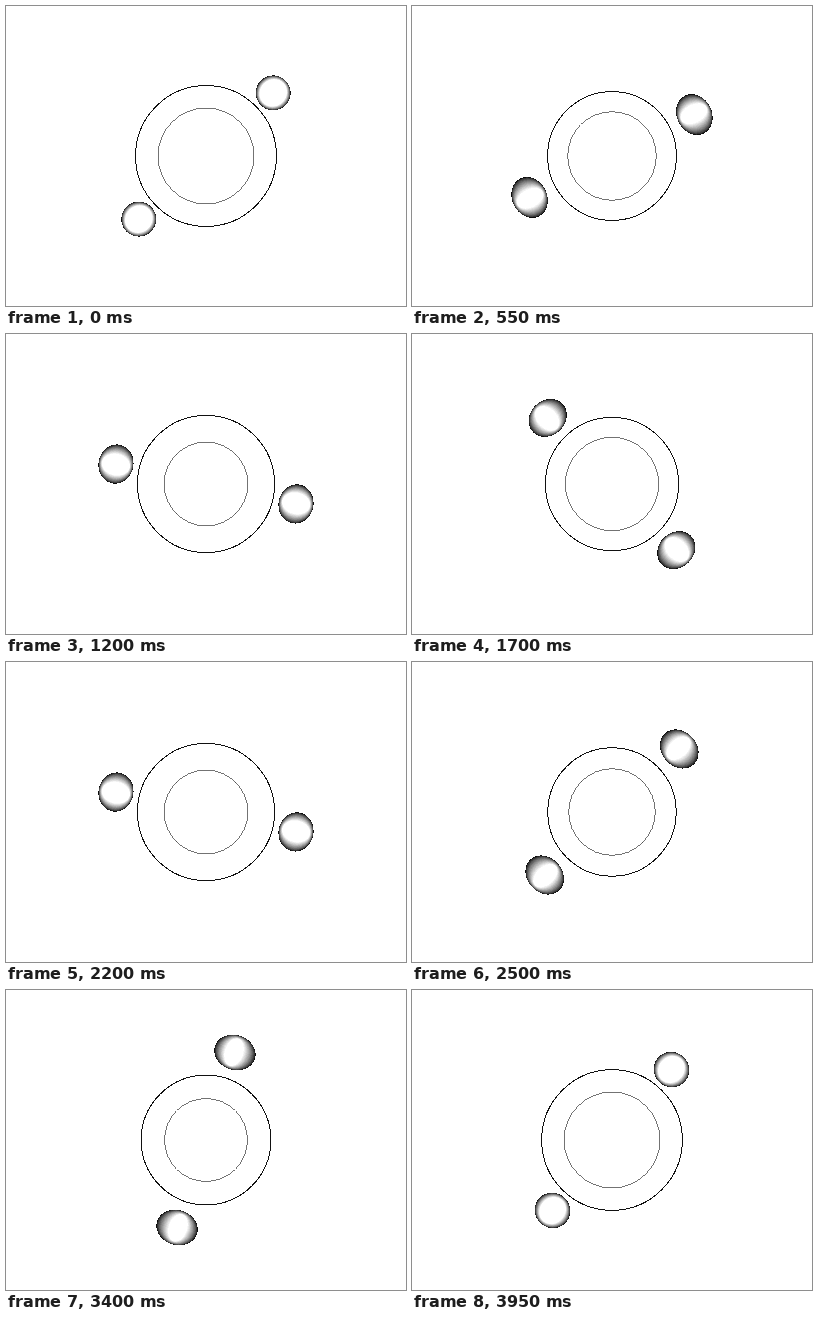
Write an HTML page that moves like this. It is 400 px wide and 300 px high and loops after 4 s.

```html
<!DOCTYPE html>
<html lang="en">
<head>
<meta charset="utf-8">
<title>Orbiting balls</title>
<style>
  html, body { margin: 0; width: 100%; height: 100%; overflow: hidden; background: #fff; }
  svg { display: block; width: 400px; height: 300px; shape-rendering: crispEdges; }
  circle { fill: none; }
</style>
</head>
<body>
<svg id="stage" viewBox="0 0 400 300">
  <circle id="outer" cx="200" cy="150" stroke="#111" stroke-width="1"/>
  <circle id="inner" cx="200" cy="150" stroke="#444" stroke-width=".75"/>
</svg>
<script>
const stage = document.getElementById('stage');
const outer = document.getElementById('outer');
const inner = document.getElementById('inner');
const ORBIT = 92.2, BALL = 17.5, LAYERS = 24;
const PERIOD = 1000, TICK = 50;

// Knots are [phase, value]; the curves repeat every turn.
const drift = [[0, 43.2], [.2, 59.5], [.4, 35.7], [.55, 44.7], [.8, 13.7], [.85, 20.5], [.95, 31.8]];
const hole = [[0, 48], [.2, 42], [.4, 41.5], [.55, 44.3], [.8, 48], [.95, 48]];

const mix = (a, b, f) => a + (b - a) * f;

function add(tag, parent) {
  return parent.appendChild(document.createElementNS('http://www.w3.org/2000/svg', tag));
}

// Smooth periodic curve through the knots.
function curve(knots, p) {
  const n = knots.length;
  const at = i => {
    const [x, y] = knots[(i + n) % n];
    return [x + Math.floor(i / n), y];
  };
  let i = n - 1;
  while (knots[i][0] > p + 1e-9) i--;
  const [a, b, c, d] = [at(i - 1), at(i), at(i + 1), at(i + 2)];
  const span = c[0] - b[0], f = (p - b[0]) / span;
  const m0 = (c[1] - a[1]) / (c[0] - a[0]) * span;
  const m1 = (d[1] - b[1]) / (d[0] - b[0]) * span;
  const f2 = f * f, f3 = f2 * f;
  return b[1] * (2 * f3 - 3 * f2 + 1) + m0 * (f3 - 2 * f2 + f)
       + c[1] * (3 * f2 - 2 * f3) + m1 * (f3 - f2);
}

// A ball is a stack of ellipses, from a dark rim to a white core.
function makeBall() {
  const group = add('g', stage);
  return {
    group,
    layers: Array.from({ length: LAYERS + 1 }, (_, k) => {
      const gray = Math.round(mix(12, 255, (k / LAYERS) ** .75));
      const el = add('ellipse', group);
      el.setAttribute('fill', `rgb(${gray},${gray},${gray})`);
      el.setAttribute('cx', ORBIT);
      return el;
    })
  };
}

const balls = [makeBall(), makeBall()];

// The stack stretches along the orbit; its core lags slightly behind.
function placeBall({ group, layers }, angle, stretch) {
  group.setAttribute('transform', `translate(200 150) rotate(${angle})`);
  layers.forEach((el, k) => {
    const f = k / LAYERS;
    el.setAttribute('cy', -stretch * f);
    el.setAttribute('rx', mix(BALL, 14, f));
    el.setAttribute('ry', mix(BALL + 3.7 * stretch, mix(13, 9, stretch), f));
  });
}

function draw(time) {
  const step = Math.floor(time / TICK) % (PERIOD / TICK);
  const p = step * TICK / PERIOD;
  const swing = Math.sin(Math.PI * p);
  const angle = 360 * p - curve(drift, p);

  outer.setAttribute('r', 70.4 - 6.2 * swing ** 2.3);
  inner.setAttribute('r', curve(hole, p));
  balls.forEach((ball, i) => placeBall(ball, angle + 180 * i, swing));
}

const start = performance.now();
function loop() {
  draw(performance.now() - start);
  requestAnimationFrame(loop);
}
loop();
</script>
</body>
</html>
```
